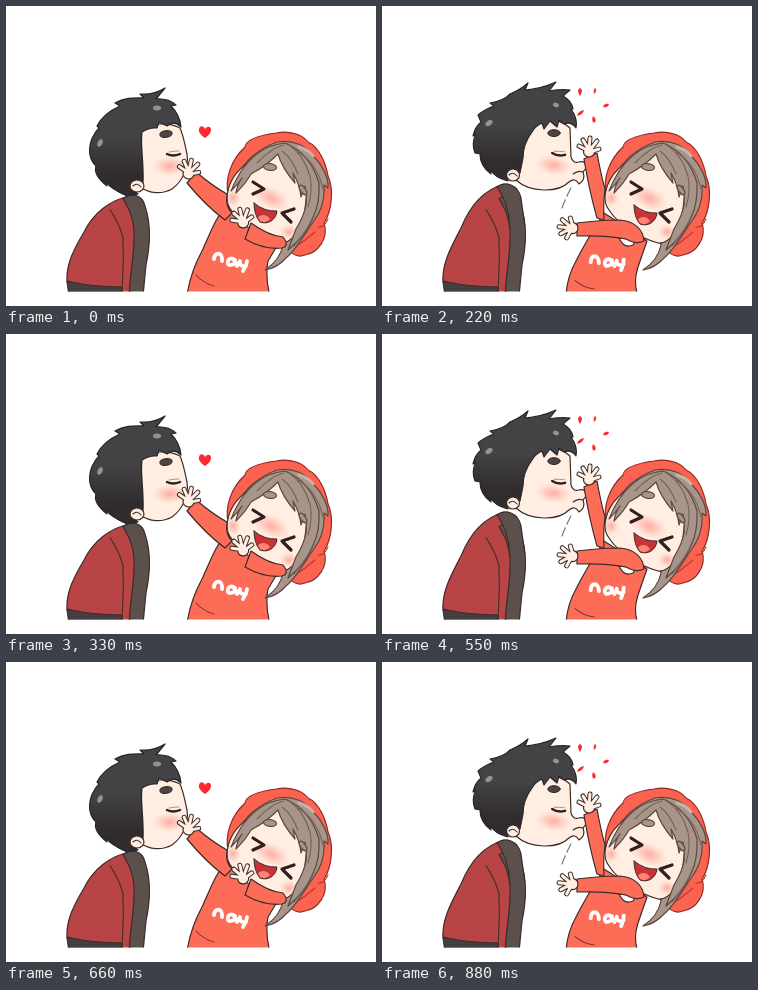
Write an HTML page that moves like this. It is 370x300 px and loops after 990 ms.

```html
<!DOCTYPE html>
<html lang="en">
<head>
<meta charset="utf-8">
<title>Kiss dodge</title>
<style>
  html, body { margin: 0; width: 100%; height: 100%; overflow: hidden; background: #fff; }
  svg { display: block; width: 370px; height: 300px; }
  path, ellipse { stroke-linecap: round; stroke-linejoin: round; }
  .skin, .red, .hood, .hair, .black, .coat, .stripe, .pants, .gap { stroke: #3c2c2a; stroke-width: 1.2; }
  .skin { fill: #ffeee1; }
  .red { fill: #fd6c56; }
  .hood { fill: #fb6350; stroke: #8f2a26; }
  .hair { fill: #a8958a; stroke: #5c4740; }
  .black { fill: url(#cool); stroke: #282426; }
  .black.warm { fill: url(#warm); }
  .coat { fill: #b84445; }
  .stripe { fill: #5c504d; }
  .pants { fill: #453f41; }
  .gap { fill: #fff; }
  .line { fill: none; stroke: #3c2c2a; stroke-width: 1.1; }
  .eye { fill: none; stroke: #30201f; stroke-width: 3.2; }
  .shade { fill: none; stroke: #756058; stroke-width: 1.1; }
  .print { fill: none; stroke: #fff; stroke-width: 3.8; }
  .love { fill: #fb2a30; }
  .blush { fill: url(#pink); }
  .shine { fill: #979190; }
</style>
</head>
<body>
<svg viewBox="0 0 370 300">
  <defs>
    <clipPath id="floor"><path d="M0 0H370V285.5H0Z"/></clipPath>
    <linearGradient id="cool" x2="0" y2="1">
      <stop offset=".45" stop-color="#434244"/><stop offset=".8" stop-color="#312d2f"/>
    </linearGradient>
    <linearGradient id="warm" x2=".2" y2="1">
      <stop offset=".3" stop-color="#444345"/><stop offset=".4" stop-color="#433433"/>
      <stop offset=".8" stop-color="#302627"/>
    </linearGradient>
    <radialGradient id="pink">
      <stop offset=".1" stop-color="#ff948c" stop-opacity=".65"/>
      <stop offset="1" stop-color="#ffa79d" stop-opacity="0"/>
    </radialGradient>

    <path id="heart" class="love" d="M0 6C-4 3-7 0-6-3C-5-7-1-6 0-3C2-6 6-6 6-2C6 1 3 4 0 6Z"/>
    <path id="fingers" d="M0 3L-10-2M0 2L-6-8M0 1L1-10M1 2L8-7M1 4L10 1" fill="none"/>
    <g id="hand">
      <use href="#fingers" stroke="#3c2c2a" stroke-width="5"/>
      <ellipse class="skin" cy="4" rx="5.5" ry="5"/>
      <use href="#fingers" stroke="#ffeee1" stroke-width="3"/>
    </g>

    <!-- Closed eye, brow and blush, placed around the eye -->
    <g id="boyFace">
      <ellipse class="blush" cx="-4" cy="11" rx="18" ry="10"/>
      <path class="eye" style="stroke-width:2.4" d="M-7-1Q-1 2 6-1"/>
      <path class="line" d="M-5-3Q0-4 5-4" opacity=".45"/>
      <ellipse cx="-8" cy="-21" rx="6.2" ry="3.4" fill="#4d4443" stroke="#282426" transform="rotate(-8 -8 -21)"/>
    </g>
    <g id="sleeve">
      <path class="line" d="M104 204Q113 216 117 232Q118 258 116 285"/>
      <path class="stripe" d="M117 193C124 186 136 188 139 200C145 218 145 236 140 259L137 290H123C124 266 129 246 128 225C127 208 121 200 117 193Z"/>
    </g>
    <g id="boyBody">
      <path class="coat" d="M124 190C103 194 87 208 78 226C68 243 60 258 61 275L64 290H124L131 225Z"/>
      <path class="pants" d="M61 275Q86 281 116 281V290H63Z"/>
      <use href="#sleeve"/>
    </g>

    <g id="girlHead">
      <path class="hood" d="M222 188C219 172 225 154 239 141C240 133 255 129 270 127C284 124 297 129 302 136C313 141 320 157 322 170C328 183 326 205 318 217C323 232 312 247 299 249Q289 253 281 242L266 227L229 204Z"/>
      <path class="line" d="M309 226Q300 234 288 242M312 221Q318 222 322 213" style="stroke:#b93a31"/>
      <path class="hair" d="M229 184C231 160 249 144 271 136C287 133 300 140 306 149C316 158 323 172 322 182L318 179C319 194 314 207 307 216C298 229 290 244 280 252Q271 262 259 264Q274 254 277 239L273 223Z"/>
      <path class="skin" d="M229 169C221 181 218 195 225 204C234 218 253 231 274 237C287 238 295 222 299 203L302 176L281 142Q249 144 229 169Z"/>
      <ellipse class="blush" cx="265" cy="192" rx="20" ry="11" transform="rotate(25 265 192)"/>
      <ellipse class="blush" cx="227" cy="192" rx="8" ry="9"/>
      <ellipse class="blush" cx="283" cy="226" rx="9" ry="8"/>
      <path class="hair" d="M279 137C257 139 237 154 225 185Q232 178 236 172Q231 179 230 187Q240 177 245 168Q260 160 272 148Q276 162 289 177L287 167Q294 179 295 191L299 180Q301 190 300 199Q298 210 290 223L282 244Q300 229 307 212Q314 197 313 177Q304 147 279 137Z"/>
      <path class="shade" d="M278 139Q265 142 251 157M276 145Q285 151 292 168M283 139Q298 149 304 170Q307 185 302 201M292 146Q311 157 317 183M309 206Q303 223 288 240"/>
      <path d="M293 141Q303 144 307 150" fill="none" stroke="#c5b4a7" stroke-width="3"/>
      <ellipse class="hair" cx="264" cy="161" rx="6.5" ry="3.4" transform="rotate(8 264 161)"/>
      <ellipse class="hair" cx="297" cy="184" rx="2.5" ry="5.5" transform="rotate(-35 297 184)"/>
      <path class="eye" d="M247 176L258 183L247 188M288 203L276 207L285 216"/>
    </g>
    <g id="smile">
      <path d="M248 197Q259 206 271 205C270 214 262 219 254 216Q248 209 248 197Z" fill="#c93236" stroke="#3c2c2a"/>
      <path d="M252 211Q259 206 264 213Q260 218 254 215Z" fill="#ff8474"/>
    </g>
    <g id="print">
      <path class="print" d="M208 253C209 245 217 246 216 255M222 255C224 250 231 253 228 258Q221 261 222 255M229 254L231 260M234 255Q233 261 240 260L241 255M240 259L237 265"/>
      <path class="line" d="M190 269Q197 277 208 280" opacity=".7"/>
    </g>
  </defs>

  <g clip-path="url(#floor)">
    <g class="pose">
      <use href="#boyBody"/>
      <path class="skin" d="M135 124Q155 113 174 122C178 131 179 140 181 148C183 161 177 175 166 183C155 189 143 187 136 182Z"/>
      <use href="#boyFace" x="168" y="149"/>
      <path class="black" d="M121 190C112 186 104 182 100 176L101 180C92 173 88 166 90 160C81 152 81 135 93 122L91 120C96 110 105 104 114 100L109 97C119 91 130 92 138 92L134 88Q148 89 159 82L150 93Q162 92 170 99L165 100Q174 109 175 121Q168 114 161 120L153 116L151 122Q144 121 136 126C134 140 138 154 137 178L128 174Q121 181 132 188Z"/>
      <ellipse class="skin" cx="131" cy="180" rx="7" ry="6"/>
      <path class="line" d="M127 180Q131 176 135 181"/>
      <ellipse class="shine" cx="94" cy="137" rx="2.5" ry="4" transform="rotate(25 94 137)"/>
      <ellipse class="shine" cx="151" cy="102" rx="4" ry="2.5"/>
      <path class="red" d="M222 197C209 212 204 228 196 245Q184 267 181 290H264Q259 271 262 255L274 235Z"/>
      <use href="#print"/>
      <use href="#girlHead"/>
      <use href="#smile"/>
      <path class="red" d="M181 177L190 166Q208 181 221 188Q219 200 226 207L219 214Q200 200 181 177Z"/>
      <path class="red" d="M245 217Q263 230 277 231Q284 240 276 242Q258 244 239 233Z"/>
      <use href="#hand" transform="translate(183 164) rotate(8)"/>
      <use href="#hand" transform="translate(236 213) rotate(-18)"/>
      <use href="#heart" x="199" y="126"/>
    </g>

    <g class="pose">
      <use href="#boyBody"/>
      <path class="skin" d="M134 125Q160 110 181 123L185 151L190 155Q197 154 197 160L192 163Q199 168 194 171Q188 171 186 176C177 187 151 194 136 183Z"/>
      <path class="line" d="M187 162Q190 164 193 163"/>
      <use href="#boyFace" x="170" y="152"/>
      <path class="black warm" d="M123 181C113 180 105 174 102 167L103 173C95 167 91 160 91 154L85 153Q81 144 85 136L82 137Q87 125 96 119L93 115Q103 104 114 100L110 96Q126 97 136 93Q146 90 152 83L148 91Q158 91 167 86L161 95Q172 95 181 101L175 102Q182 110 182 122Q177 115 171 117L168 123L164 117L159 124L155 117Q148 125 143 126Q136 147 139 158V177L130 174Q122 175 123 181Z"/>
      <ellipse class="skin" cx="131" cy="181" rx="6.5" ry="6"/>
      <path class="line" d="M127 181Q131 177 135 182"/>
      <ellipse class="shine" cx="97" cy="133" rx="4" ry="2.6" transform="rotate(-50 97 133)"/>
      <ellipse class="shine" cx="157" cy="103" rx="3" ry="2.2" transform="rotate(20 157 103)"/>
      <path class="line" d="M187 180Q185 190 182 198" stroke-dasharray="3 4" opacity=".7"/>
      <path class="red" d="M223 201C209 212 207 229 196 247Q184 267 181 290H252Q249 281 257 266Q253 257 256 246L268 236Z"/>
      <use href="#print"/>
      <use href="#girlHead" y="2"/>
      <path class="hair" d="M230 183Q226 203 210 214Q220 201 222 188Z"/>
      <path d="M254 203Q258 198 261 205Q265 202 267 211Q259 215 254 203Z" fill="#c93236" stroke="#3c2c2a"/>
      <path class="gap" d="M236 220Q235 235 250 241L255 236Z"/>
      <path class="red" d="M167 203Q194 204 216 201L226 214Q195 217 167 214Z"/>
      <path class="red" d="M222 194L235 185C248 199 259 218 265 235Q260 242 253 235Q236 216 222 194Z"/>
      <use href="#hand" transform="translate(160 208) rotate(-75)"/>
      <use href="#hand" transform="translate(225 182) rotate(-12)"/>
      <use href="#heart" transform="translate(201 110) rotate(-10) scale(1.95 1.6)"/>
    </g>

    <g class="pose">
      <path class="coat" d="M122 178C101 184 87 202 79 222C68 243 60 258 61 275L64 290H124L131 225Z"/>
      <path class="pants" d="M61 275Q86 281 116 281V290H63Z"/>
      <use href="#sleeve"/>
      <path class="stripe" d="M115 181C123 175 136 178 139 192L143 222H128C127 201 121 189 115 181Z" stroke-dasharray="60 16 100"/>
      <path class="skin" d="M144 120Q169 106 188 122L189 151Q191 158 197 156Q204 154 204 162L201 166Q204 174 197 178Q193 171 187 176C176 187 148 187 134 174Z"/>
      <path class="line" d="M191 168Q196 164 201 166"/>
      <use href="#boyFace" transform="translate(177 149) rotate(8)"/>
      <path class="black" d="M126 175C118 173 111 169 108 163L109 168C101 162 98 156 98 148L93 147Q89 137 94 128L91 130Q93 121 99 116L96 109Q103 103 112 100L108 97Q122 95 128 88Q138 84 146 77L143 84Q158 83 174 76L167 85Q179 83 188 84L181 90Q190 95 191 103L189 103Q196 112 194 122Q189 115 182 118L177 114L175 121L168 115L162 123L160 117Q153 120 150 126Q141 138 141 152L138 167L131 162Q125 166 126 175Z"/>
      <ellipse class="skin" cx="131" cy="169" rx="6.5" ry="6"/>
      <path class="line" d="M127 169Q131 165 135 170"/>
      <ellipse class="shine" cx="107" cy="117" rx="4" ry="2.5" transform="rotate(-35 107 117)"/>
      <ellipse class="shine" cx="174" cy="99" rx="3" ry="2.2" transform="rotate(20 174 99)"/>
      <path class="line" d="M180 202Q184 191 190 180" stroke-dasharray="9 4" opacity=".7"/>
      <path class="red" d="M222 207C211 224 203 237 194 255Q185 271 184 290H256Q251 276 256 261L265 235Z"/>
      <use href="#print" transform="rotate(-8 225 257) translate(1 1)"/>
      <use href="#girlHead" x="2"/>
      <use href="#smile" x="4" y="2"/>
      <path class="gap" d="M237 232Q242 243 251 239L254 234Z"/>
      <path class="red" d="M202 153L215 147Q219 169 223 183Q221 200 222 214L215 212Q207 184 202 153Z"/>
      <path class="red" d="M195 217Q219 214 238 214C252 215 261 223 262 235Q254 239 244 233Q223 229 195 230Z"/>
      <use href="#hand" transform="translate(207 142)"/>
      <use href="#hand" transform="translate(187 222) rotate(-88)"/>
      <path class="love" d="M198 90Q194 84 198 82Q202 84 198 90ZM212 88Q211 84 213 82Q216 84 212 88ZM221 101Q222 97 227 98Q226 102 221 101ZM202 104Q201 109 195 110Q196 105 202 104ZM211 110Q216 114 212 117Q209 115 211 110Z"/>
    </g>
  </g>
</svg>
<script>
  const STEP = 110;
  const poses = [...document.querySelectorAll('.pose')];
  const start = performance.now();

  function draw(now) {
    const current = Math.floor(Math.max(0, now - start) / STEP) % poses.length;
    poses.forEach((pose, i) => { pose.style.display = i === current ? '' : 'none'; });
    requestAnimationFrame(draw);
  }
  draw(start);
</script>
</body>
</html>
```
